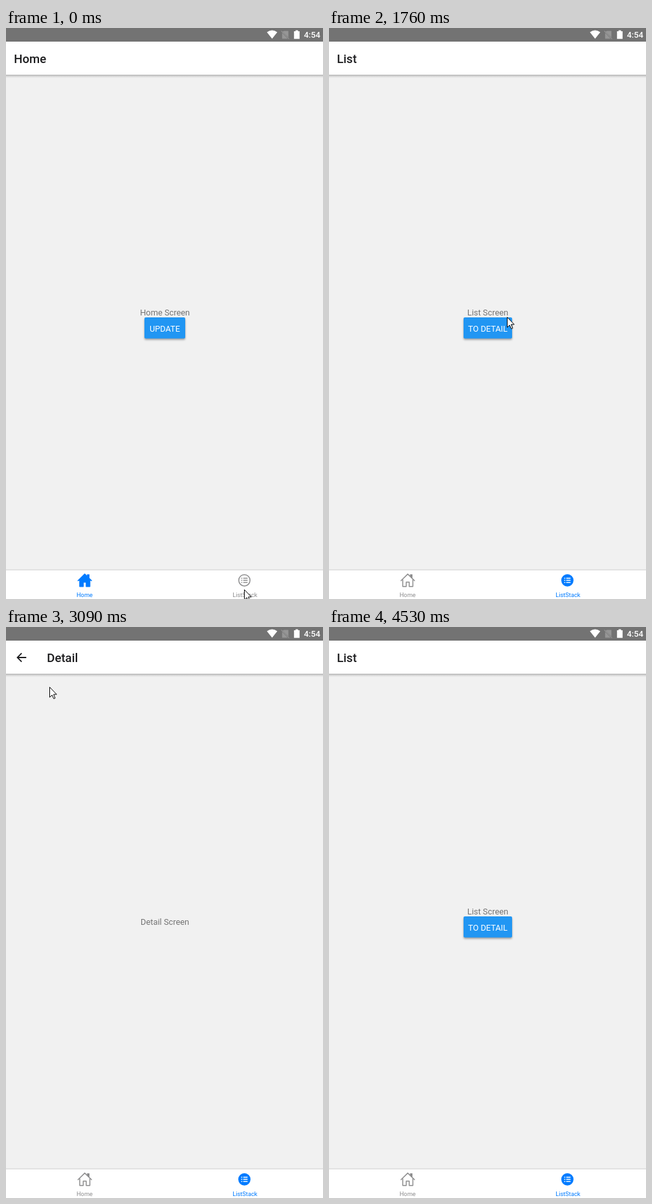
An HTML page for the animation above (4.79 s loop, 490x880 px).

```html
<!DOCTYPE html>
<html lang="en">
<head>
<meta charset="utf-8">
<title>Tab and stack navigation</title>
<style>
  html, body { margin: 0; width: 100%; height: 100%; overflow: hidden; background: #f1f1f1; }
  svg { display: block; width: 490px; height: 880px; font-family: Roboto, sans-serif; }
  .title { font-size: 18.6px; font-weight: 500; fill: #1c1c1e; }
  .body { font-size: 12.85px; fill: #737373; text-anchor: middle; }
  .button rect { fill: #2196f3; filter: drop-shadow(0 2px 1.5px rgba(0, 0, 0, .35)); }
  .button text { font-size: 12.75px; fill: #fff; text-anchor: middle; }
  .pressed rect { fill: #2890e4; }
  .card { transform-origin: 245px 428px; }
  .tab { --main: #8e8e8f; --fill: none; --mark: #8e8e8f; }
  .tab.on { --main: #007bff; --fill: #007bff; --mark: #fff; }
  .tab text { font-size: 9.3px; fill: var(--main); text-anchor: middle; }
  .shape { fill: var(--fill); stroke: var(--main); stroke-width: 1.5; stroke-linejoin: round; stroke-linecap: round; }
  .solid { fill: var(--main); }
  .mark { fill: none; stroke: var(--mark); stroke-width: 1.5; }
</style>
</head>
<body>
<svg viewBox="0 0 490 880">
  <defs>
    <linearGradient id="shade" x2="0" y2="1">
      <stop offset="0" stop-opacity=".27"/>
      <stop offset=".35" stop-opacity=".14"/>
      <stop offset="1" stop-opacity="0"/>
    </linearGradient>
    <g id="page">
      <rect y="21" width="490" height="814" fill="#f1f1f1"/>
      <rect y="72" width="490" height="5" fill="url(#shade)"/>
      <rect y="21" width="490" height="51" fill="#fff"/>
    </g>
  </defs>

  <g id="home">
    <use href="#page"/>
    <text class="title" x="12.3" y="54">Home</text>
    <text class="body" x="245.7" y="443">Home Screen</text>
    <g class="button">
      <rect x="214" y="446" width="63" height="32.5" rx="2"/>
      <text x="245.5" y="467.7">UPDATE</text>
    </g>
  </g>

  <g id="list" class="card">
    <use href="#page"/>
    <text class="title" x="12.3" y="54">List</text>
    <text class="body" x="245.5" y="443">List Screen</text>
    <g id="toDetail" class="button">
      <rect x="208" y="446" width="75" height="32.5" rx="2"/>
      <text x="245.5" y="467.7">TO DETAIL</text>
    </g>
  </g>

  <g id="detail" class="card">
    <use href="#page"/>
    <path d="M31.3 47H18M24.2 40.3L17.6 47L24.2 53.7" fill="none" stroke="#1c1c1e" stroke-width="1.8"/>
    <text class="title" x="63.3" y="54">Detail</text>
    <text class="body" x="245.6" y="459">Detail Screen</text>
  </g>

  <rect width="490" height="21" fill="#737373"/>
  <path d="M411.3 16.5L403.3 6.4Q411.3 .6 419.3 6.4Z" fill="#fff"/>
  <path d="M429.5 4.5H436.5V14.5L427.5 5.8ZM426.8 7.5L435.5 16.5H426.8Z" fill="#969696"/>
  <path d="M425.5 4.5L437.5 16.8" stroke="#969696" stroke-width="1.1"/>
  <path d="M445.2 5H447.6V3.6H451.4V5H453.8V16.8H445.2Z" fill="#fff"/>
  <text x="460.4" y="15.3" font-size="12.9" font-weight="500" fill="#fff">4:54</text>

  <rect y="835" width="490" height="45" fill="#fff"/>
  <rect y="834" width="490" height="2" fill="#e2e2e2"/>
  <g id="homeTab" class="tab">
    <path class="shape" d="M114 850.5V860.7H119.4V854H124V860.7H129.6V850.5"/>
    <path class="shape" d="M111.3 851.8L121.7 841.6L132.2 851.8"/>
    <path class="solid" d="M125.2 842H129V848.8L125.2 845Z"/>
    <text x="121.5" y="877.2">Home</text>
  </g>
  <g id="listTab" class="tab">
    <circle class="shape" cx="368.5" cy="851.2" r="8.7"/>
    <path class="mark" d="M363.6 847.9h1.6m1.5 0h6.7M363.6 851.2h1.6m1.5 0h6.7M363.6 854.5h1.6m1.5 0h6.7"/>
    <text x="369.4" y="877.2">ListStack</text>
  </g>

  <path id="cursor" d="M.5 .7V16.3L4.2 12.9L6.8 18.5L9 17.6L6.6 11.9H11.3Z" fill="#fff" stroke="#000"/>
</svg>
<script>
  const LOOP = 4790, FRAME = 133.5, LEAD = 10; // ms; the screen repaints once per FRAME
  const TO_LIST = 8, PUSH = 18, POP = 26.98, SLIDE = 3; // in repaints
  const ZOOM = 1.094;

  // pointer stops: repaint, x, y
  const stops = [
    [0, 368, 865], [3, 366, 857], [10, 366, 857],   // tap the list tab
    [11, 197, 484], [13, 275, 445], [16, 269, 460], // tap the button
    [18, 269, 460], [20, 143, 298], [21, 140, 200],
    [23, 67, 92], [25, 30, 53], [27, 28, 52],       // tap back
    [30, 276, 500], [32, 402, 829], [34, 470, 900]  // leave
  ];

  const $ = id => document.getElementById(id);
  const show = (id, on) => $(id).setAttribute('display', on ? 'inline' : 'none');
  const mix = (a, b, k) => a + (b - a) * k;
  const clamp = k => Math.min(1, Math.max(0, k));
  const easeOut = k => 1 - (1 - clamp(k)) ** 3;

  function pointer(f) {
    const next = Math.max(1, stops.findIndex(s => s[0] >= f));
    const [a, ax, ay] = stops[next - 1], [b, bx, by] = stops[next];
    const k = clamp((f - a) / (b - a));
    return [mix(ax, bx, k), mix(ay, by, k)].map(Math.round);
  }

  function draw(ms) {
    const f = Math.min(34, Math.floor((ms + LEAD) / FRAME));
    const onList = f >= TO_LIST, pushed = f >= PUSH, closing = f >= POP;
    const p = closing ? 1 - easeOut((f - POP) / SLIDE) : easeOut((f - PUSH) / SLIDE);
    const listScale = closing ? mix(1, ZOOM, p) : pushed ? ZOOM : 1;

    show('home', !onList);
    show('list', onList);
    show('detail', p > 0);
    $('homeTab').classList.toggle('on', !onList);
    $('listTab').classList.toggle('on', onList);
    $('toDetail').classList.toggle('pressed', pushed && !closing);
    $('list').style.transform = `scale(${listScale})`;
    $('detail').style.transform = `scale(${mix(closing ? .9 : .85, 1, p)})`;
    $('detail').style.opacity = clamp(1.06 * p * p);
    $('cursor').setAttribute('transform', `translate(${pointer(f)})`);
  }

  const start = performance.now();
  function tick() {
    draw((performance.now() - start) % LOOP);
    requestAnimationFrame(tick);
  }
  tick();
</script>
</body>
</html>
```
